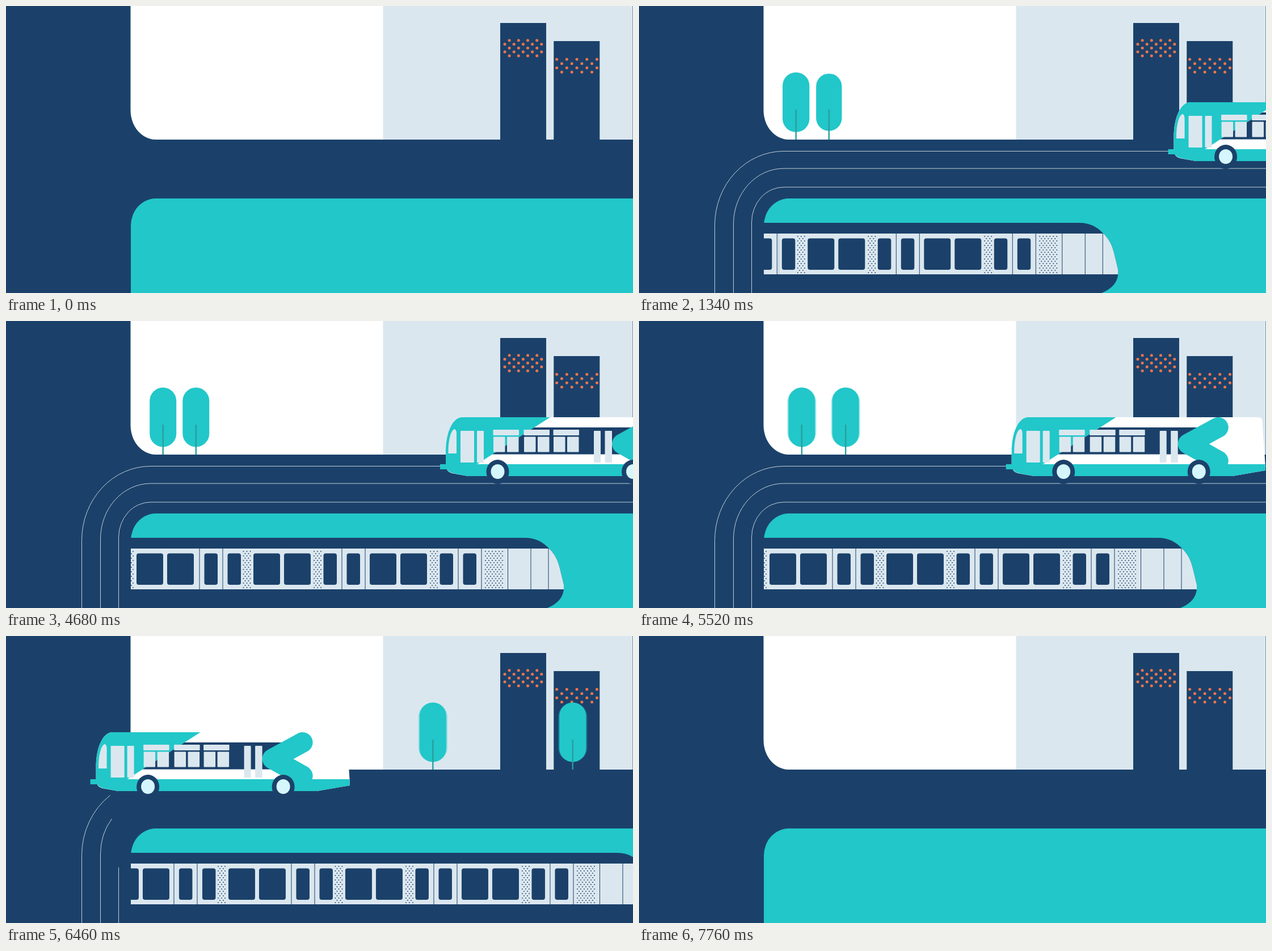
Animation, 1105 px wide and 507 px high, one loop 8.88 s. Source, as an HTML page:

```html
<!DOCTYPE html>
<html lang="en">
<head>
<meta charset="utf-8">
<title>City transit</title>
<style>
html, body { margin: 0; width: 100%; height: 100%; overflow: hidden; background: #1b416a; }
svg { display: block; width: 1105px; height: 507px; }
.navy { fill: #1b416a; }
.teal { fill: #22c7c9; }
.light { fill: #dbe7ef; }
.white { fill: #fff; }
.track { fill: none; stroke: #c3ced9; stroke-width: 1; }
.dots { fill: none; stroke: #1b416a; stroke-width: 1.8; stroke-linecap: round; }
.lamps { fill: none; stroke: #f3744c; stroke-width: 5; stroke-linecap: round; }
</style>
</head>
<body>
<svg viewBox="0 0 1105 507">
  <defs><clipPath id="tunnel"><rect x="220" y="340" width="885" height="167"/></clipPath></defs>
  <rect class="navy" width="1105" height="507"/>
  <path class="white" d="M219.5 0H665V236H264A44.5 52 0 0 1 219.5 184Z"/>
  <rect class="light" x="664.5" width="440" height="236"/>
  <path class="navy" d="M871 30H952V236H871ZM965.3 62H1046.3V236H965.3Z"/>
  <path class="lamps" id="lamps"/>
  <path class="teal" d="M220 507V388A44 48 0 0 1 264 340H1105V507Z"/>

  <path class="track" pathLength="1" d="M1105 256.5H255A121.5 131 0 0 0 133.5 387.5V507"/>
  <path class="track" pathLength="1" d="M1105 287H255A88.5 98 0 0 0 166.5 385V507"/>
  <path class="track" pathLength="1" d="M1105 320H255A56.5 62 0 0 0 198.5 382V507"/>

  <g id="trees"></g>

  <g clip-path="url(#tunnel)"><g id="train">
    <g id="half">
      <path class="navy" d="M382 383H915Q940 383 957 402C967 411 973 424 976 437L983 466V474Q981 496 954 507H382Z"/>
      <path class="light" d="M382 402H957C967 411 973 424 976 437L983 466V474H382Z"/>
      <g id="parts"></g>
    </g>
    <use href="#half" transform="matrix(-1 0 0 1 767 0)"/>
    <g id="middle"></g>
  </g></g>

  <g id="bus">
    <path class="white" d="M418 170H823Q831 170 831 178L836 254V264L778 274H428L400 269Q389 266 389 254V232C389 195 402 170 418 170Z"/>
    <path class="teal" d="M573 170H418C402 170 389 195 389 232V253H379V262H391Q394 267 402 269L428 274H778L836 264V253H444Z"/>
    <path class="navy" d="M545 188H716L700 235.5H471Z"/>
    <path d="M753 188L700 217L753 247" fill="none" stroke="#22c7c9" stroke-width="36" stroke-linecap="round" stroke-linejoin="round"/>
    <path class="light" d="M404 191Q408 191 408 200V234H393.500C393 214 397 194 404 191Z"/>
    <g id="panes"></g>
    <g id="wheels"></g>
  </g>
</svg>
<script>
const $ = id => document.getElementById(id);
const rect = (x, y, w, h, r, c) =>
  `<rect class="${c}" x="${x}" y="${y}" width="${w}" height="${h}" rx="${r}"/>`;

// Staggered dots: odd rows shift by half a step.
function dotPath(x, y, cols, rows, dx, dy, firstShift = 0) {
  let d = '';
  for (let r = 0; r < rows; r++) {
    const odd = (r + firstShift) % 2;
    for (let c = 0; c < cols - odd; c++) d += `M${x + (c + odd / 2) * dx} ${y + r * dy}h.01`;
  }
  return d;
}
$('lamps').setAttribute('d',
  dotPath(879, 60.7, 5, 5, 16.2, 6.8, 1) + dotPath(970.6, 94.2, 5, 4, 17.7, 7.5));

// Train fittings
const bigPane = x => rect(x, 410.5, 47, 55.500, 4, 'navy');
const smallPane = x => rect(x, 410.5, 23.5, 55.500, 4, 'navy');
const seam = x => rect(x - .5, 402, 1, 72, 0, 'navy');
const speckle = (x, cols = 3) =>
  `<path class="dots" d="${dotPath(x + 1, 407, cols, 17, 6, 4)}"/>`;
const all = (make, ...xs) => xs.map(x => make(x)).join('');
$('parts').innerHTML = all(bigPane, 436, 490, 641, 695) + all(smallPane, 559.5, 600.5, 764.5, 805.5)
  + all(seam, 592, 633, 797, 838, 884.5, 925, 956) + all(x => speckle(x), 542, 747) + speckle(844, 6);
$('middle').innerHTML = all(smallPane, 349.5, 390.5) + all(seam, 341, 382) + speckle(417.5);

// Bus fittings
$('panes').innerHTML =
  [[415, 24], [444, 12], [650, 12], [669.5, 12.5]].map(([x, w]) => rect(x, 194, w, 56, 1, 'light')).join('')
  + [473, 527, 579].map(x => rect(x - .5, 192, 45.500, 10, 1, 'light')
    + rect(x, 204.500, 20.5, 27, 1, 'light') + rect(x + 24, 204.500, 20.5, 27, 1, 'light')).join('');
$('wheels').innerHTML = [480.5, 719].map(x =>
  `<ellipse class="navy" cx="${x}" cy="266.500" rx="20" ry="21.500"/>
   <ellipse cx="${x}" cy="266" rx="12" ry="13" fill="#d5f6fd"/>`).join('');

// x, entry start, exit start
const trees = [[276.7, 640, 5160], [334.8, 890, 5007]];
$('trees').innerHTML = trees.map(() => `<g><g>
  ${rect(-25.5, -52.5, 51, 105, 25.5, 'teal blur')}${rect(-23.5, -52.5, 47, 105, 23.5, 'teal')}</g>
  <rect x="-1.2" y="-53" width="2.4" height="53" fill="#2a9d9d"/></g>`).join('');
const treeNodes = [...$('trees').children];
const tracks = [...document.querySelectorAll('.track')];
const trackIn = [400, 250, 100], trackOut = [5896, 5874, 5817];

const clamp = u => Math.min(1, Math.max(0, u));
const inOut = u => u < .5 ? 4 * u ** 3 : 1 - 4 * (1 - u) ** 3;
const elastic = u => u <= 0 ? 0 : u >= 1 ? 1 : 1 + 2 ** (-10 * u) * Math.sin((u - .125) * 4 * Math.PI);
const after = (t, start) => Math.max(0, t - start);
const place = (node, value) => node.setAttribute('transform', value);

function draw(t) {
  const left = after(2360, t);
  place($('train'), `translate(${1361 * inOut(clamp((t - 5656) / 2598)) - (.00508 * left) ** 3})`);
  place($('bus'), `translate(${386 + (.00541 * left) ** 3 - (.01041 * after(t, 4680)) ** 2.2})`);

  tracks.forEach((track, i) => {
    const head = inOut(clamp((t - trackIn[i]) / 900));
    const tail = inOut(clamp((t - trackOut[i]) / 900));
    track.style.strokeDasharray = `0 ${tail} ${head - tail} 2`;
    track.style.visibility = head > tail ? 'visible' : 'hidden';
  });

  trees.forEach(([x, start, exit], i) => {
    const [crown, trunk] = treeNodes[i].children;
    const shift = (.006 * after(t, exit)) ** 3;
    place(treeNodes[i], `translate(${x + shift} 0)`);
    place(crown, `translate(0 170) scale(${elastic((t - start) / 1000)})`);
    place(trunk, `translate(0 236) scale(1 ${1 - (1 - clamp((t - start) / 400)) ** 3})`);
    crown.firstElementChild.setAttribute('opacity', shift > 1 ? .4 : 0);
  });
}

function tick() {
  draw(performance.now() % 8880);
  requestAnimationFrame(tick);
}
tick();
</script>
</body>
</html>
```
